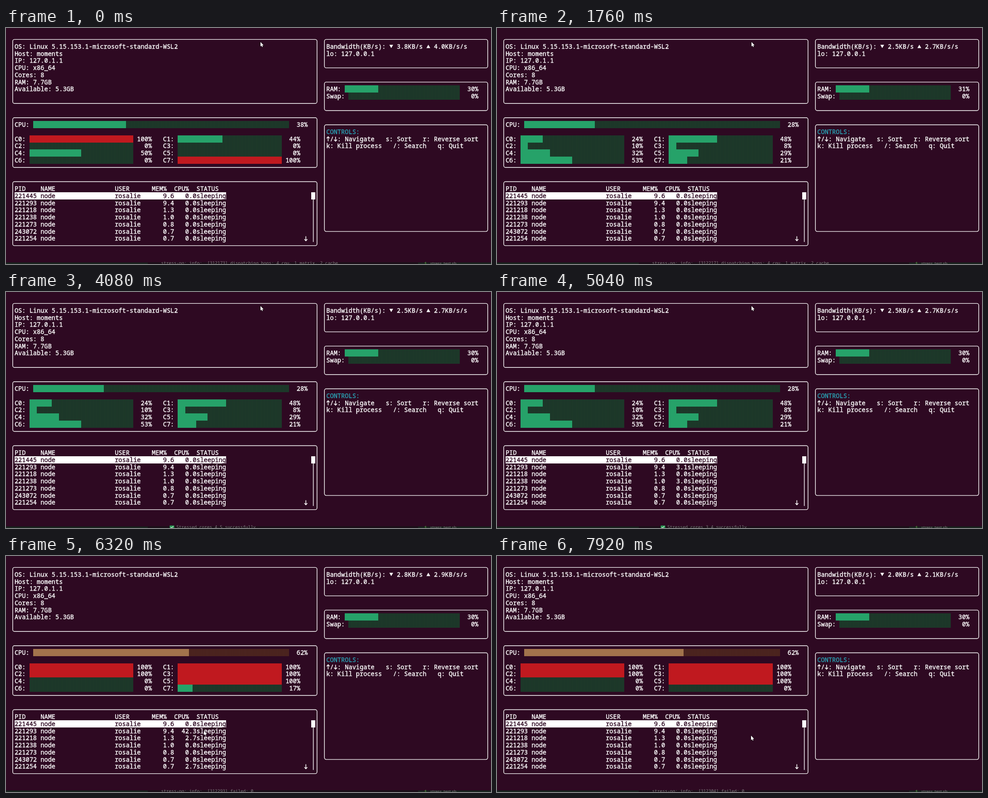
An HTML page with a canvas that plays this animation: 1071 by 523 pixels, repeating every 8000 ms.

```html
<!DOCTYPE html>
<html lang="en">
<head>
<meta charset="utf-8">
<style>
html, body { margin: 0; height: 100%; overflow: hidden; background: #2e0922; }
canvas { display: block; }
</style>
</head>
<body>
<canvas id="stage" width="1071" height="523"></canvas>
<script>
const ctx = document.getElementById('stage').getContext('2d');
const LOOP = 8000, W = 8.195, H = 15.76;
const BG = '#2e0922', WHITE = '#fff';
const GREEN = ['#26a269', '#1e3a2b'], ORANGE = ['#a2734c', '#4e2520'], RED = ['#c0191f', '#4e1420'];
const MONO = '"Noto Sans Mono", "DejaVu Sans Mono", monospace';

// Terminal grid: left edge of a column, centre line of a row.
const colX = c => 2.5 + c * W;
const rowY = r => 40.8 + r * H;

const between = (t, from, to) => t >= from && t < to;
// The latest entry of a timeline that has started.
const current = (timeline, t) => timeline.findLast(entry => entry.from <= t);

// Eight cores: the listed ones run at full load, the rest idle unless given.
const stress = (busy, others = {}) =>
  Array.from({ length: 8 }, (_, i) => busy.includes(i) ? 100 : others[i] || 0);

const load = [
  { from: 0, total: 37.5, cores: stress([0, 7], { 1: 44, 4: 50 }), down: '3.8', up: '4.0' },
  { from: 560, total: 31, cores: stress([0, 7], { 1: 44, 4: 5 }), down: '2.9', up: '3.1' },
  { from: 1200, total: 28, cores: [24, 48, 10, 8, 32, 29, 53, 21], down: '2.5', up: '2.7' },
  { from: 6240, total: 61.5, cores: stress([0, 1, 2, 3, 5], { 7: 17 }), down: '2.8', up: '2.9' },
  { from: 6800, total: 62.4, cores: stress([0, 1, 2, 3, 5]), down: '2.0', up: '2.1' }
];

const ramUsed = t => between(t, 1280, 3280) ? 31 : 30;

// CPU share of a process row: a few short bursts, otherwise idle.
function cpuShare(row, t) {
  if (between(t, 6240, 7040)) return row === 1 ? 42.3 : row === 2 || row === 6 ? 2.7 : 0;
  if (between(t, 4800, 6240)) return row === 1 ? 3.1 : row === 3 ? 3 : 0;
  return between(t, 2160, 2880) && row === 1 ? 2.9 : 0;
}

const info = (id, text) => `stress-ng: info:  [${id}] ${text}`;
const HOGS = 'dispatching hogs: 4 cpu, 1 matrix, 2 cache';
const log = [
  { from: 0, text: info(312173, HOGS) },
  { from: 960, text: info(312217, HOGS) },
  { from: 2400, text: 'ne stressing' },
  { from: 3600, text: 'Stressed cores 4,5 successfully', done: true },
  { from: 4880, text: 'Stressed cores 3,4 successfully', done: true },
  { from: 6080, text: info(312293, 'failed: 0') },
  { from: 6800, text: info(312304, 'failed: 0') }
];

// Pointer stops: it leaves each stop at `from` and takes `move` ms to the next.
const stops = [
  { from: 5360, move: 400, x: 562, y: 31 },
  { from: 5760, move: 560, x: 525, y: 161 },
  { from: 6640, move: 480, x: 437, y: 387 },
  { from: 7120, move: 480, x: 545, y: 230 },
  { from: LOOP, move: 1, x: 561, y: 398 }
];

const processes = ['221445 9.6', '221293 9.4', '221218 1.3', '221238 1.0',
  '221273 0.8', '243072 0.7', '221254 0.7'];

function print(col, row, text, color = WHITE) {
  ctx.font = `500 13.65px ${MONO}`;
  ctx.textAlign = 'center';
  ctx.fillStyle = ctx.strokeStyle = color;
  ctx.lineWidth = 0.4;
  [...text].forEach((ch, i) => {
    if (ch === ' ') return;
    const x = colX(col + i + 0.5), y = rowY(row) + 5;
    ctx.fillText(ch, x, y);
    ctx.strokeText(ch, x, y);
  });
}

const printRight = (end, row, text) => print(end - text.length, row, text);

function cells(col, row, count, color) {
  const x = Math.round(colX(col)), y = Math.round(rowY(row - 0.5));
  ctx.fillStyle = color;
  ctx.fillRect(x, y, Math.round(colX(col + count)) - x, Math.round(rowY(row + 0.5)) - y);
}

function frame(left, top, right, bottom) {
  const x = colX(left + 0.5), y = rowY(top) + 0.3;
  ctx.strokeStyle = WHITE;
  ctx.lineWidth = 1.4;
  ctx.beginPath();
  ctx.roundRect(x, y, (right - left) * W, (bottom - top) * H, 4);
  ctx.stroke();
}

function meter(label, labelCol, row, start, end, percentEnd, value) {
  const [full, empty] = value > 80 ? RED : value > 60 ? ORANGE : GREEN;
  const size = end - start, filled = Math.floor(size * value / 100);
  print(labelCol, row, label + ':');
  cells(start, row, size, empty);
  ctx.fillStyle = 'rgba(0,0,0,.08)';
  for (let i = filled * 4; i < size * 4; i++)
    ctx.fillRect(colX(start + i / 4), Math.round(rowY(row - 0.5)), 1, H);
  cells(start, row, filled, full);
  printRight(percentEnd, row, Math.round(value) + '%');
}

function polygon(points, outline) {
  ctx.beginPath();
  points.forEach(([x, y]) => ctx.lineTo(x, y));
  ctx.closePath();
  if (outline) {
    ctx.strokeStyle = outline;
    ctx.lineWidth = 1.4;
    ctx.stroke();
  }
  ctx.fillStyle = WHITE;
  ctx.fill();
}

function triangle(col, row, dir) {
  const x = colX(col + 0.5), y = rowY(row);
  polygon([[x - 4.2, y + 3.6 * dir], [x + 4.2, y + 3.6 * dir], [x, y - 3.8 * dir]]);
}

// Vertical arrow filling one cell; dir is 1 for up, -1 for down.
function arrow(col, row, dir) {
  const x = colX(col + 0.5), y = rowY(row) + 0.3, tip = y - 5 * dir;
  ctx.strokeStyle = WHITE;
  ctx.lineWidth = 1.5;
  ctx.beginPath();
  ctx.moveTo(x, y + 5 * dir);
  ctx.lineTo(x, tip);
  ctx.moveTo(x - 3.3, tip + 3.6 * dir);
  ctx.lineTo(x, tip);
  ctx.lineTo(x + 3.3, tip + 3.6 * dir);
  ctx.stroke();
}

function drawSystem() {
  frame(1, -1, 83, 8);
  ['OS: Linux 5.15.153.1-microsoft-standard-WSL2', 'Host: moments', 'IP: 127.0.1.1',
    'CPU: x86_64', 'Cores: 8', 'RAM: 7.7GB', 'Available: 5.3GB']
    .forEach((line, i) => print(2, i, line));
}

function drawLoad({ total, cores, down, up }) {
  frame(1, 10, 83, 17);
  meter('CPU', 2, 11, 7, 76, 81, total);
  cores.forEach((value, i) => {
    const shift = i % 2 * 40;
    meter('C' + i, 2 + shift, 13 + (i >> 1), 6 + shift, 34 + shift, 39 + shift, value);
  });

  frame(85, -1, 129, 3);
  print(86, 0, `Bandwidth(KB/s):   ${down}KB/s   ${up}KB/s/s`);
  triangle(103, 0, -1);
  triangle(113, 0, 1);
  print(86, 1, 'lo: 127.0.0.1');
}

function drawMemory(t) {
  frame(85, 5, 129, 9);
  meter('RAM', 86, 6, 91, 122, 127, ramUsed(t));
  meter('Swap', 86, 7, 92, 122, 127, 0);
}

function drawControls() {
  frame(85, 11, 129, 26);
  print(86, 12, 'CONTROLS:', '#2aa1b3');
  print(86, 13, ' / : Navigate   s: Sort   r: Reverse sort');
  arrow(86, 13, 1);
  arrow(88, 13, -1);
  print(86, 14, 'k: Kill process   /: Search   q: Quit');
}

function drawProcesses(t) {
  frame(1, 19, 83, 28);
  print(2, 20, 'PID    NAME                USER      MEM%  CPU%  STATUS');
  cells(2, 21, 57, WHITE);
  processes.forEach((process, i) => {
    const [pid, mem] = process.split(' ');
    const line = pid.padEnd(7) + 'node'.padEnd(20) + 'rosalie'.padEnd(10) +
      mem.padStart(6) + cpuShare(i, t).toFixed(1).padStart(6) + 'sleeping';
    print(2, 21 + i, line, i ? WHITE : BG);
  });
  cells(82, 21, 1, WHITE);
  ctx.fillRect(colX(82.5) - 0.7, rowY(21.5), 1.4, H * 6);
  arrow(80, 27, -1);
}

// Top edge of the editor window behind the terminal.
function drawEditor({ text, done }) {
  ctx.fillStyle = '#1b0f18';
  ctx.fillRect(0, 519, 1071, 4);
  ctx.fillStyle = '#1b2420';
  ctx.fillRect(0, 520, 313, 3);
  ctx.fillRect(910, 520, 161, 3);

  if (done) {
    ctx.fillStyle = '#2b9a55';
    ctx.fillRect(361.5, 517.5, 10, 6);
    ctx.strokeStyle = '#cfe8d8';
    ctx.lineWidth = 1.2;
    ctx.beginPath();
    ctx.moveTo(363.5, 521);
    ctx.lineTo(365.5, 523);
    ctx.lineTo(369.5, 519);
    ctx.stroke();
  }
  ctx.textAlign = 'left';
  ctx.font = `9.42px ${MONO}`;
  ctx.fillStyle = '#80787d';
  [...text].forEach((ch, i) => ctx.fillText(ch, (done ? 376 : 342.5) + i * 5.66, 524.3));

  ctx.font = '9.2px "Open Sans", sans-serif';
  ctx.fillText('stress_test.sh', 937, 524.5);
  ctx.fillStyle = '#4f8a3f';
  ctx.fillText('$', 924, 524.5);
}

function drawPointer(t) {
  const i = Math.max(0, stops.findLastIndex(stop => stop.from <= t));
  const a = stops[i], b = stops[i + 1];
  const k = Math.min(1, Math.max(0, (t - a.from) / a.move));
  const x = a.x + (b.x - a.x) * k, y = a.y + (b.y - a.y) * k;
  polygon([[0, 0], [0, 10], [2.2, 8], [3.7, 11.3], [5.2, 10.6], [3.8, 7.4], [6.8, 7.2]]
    .map(([dx, dy]) => [x + dx, y + dy]), '#14040f');
}

function draw() {
  const t = performance.now() % LOOP;
  ctx.fillStyle = BG;
  ctx.fillRect(0, 0, 1071, 523);
  drawEditor(current(log, t));
  drawSystem();
  drawLoad(current(load, t));
  drawMemory(t);
  drawControls();
  drawProcesses(t);
  drawPointer(t);
  requestAnimationFrame(draw);
}
draw();
</script>
</body>
</html>
```
